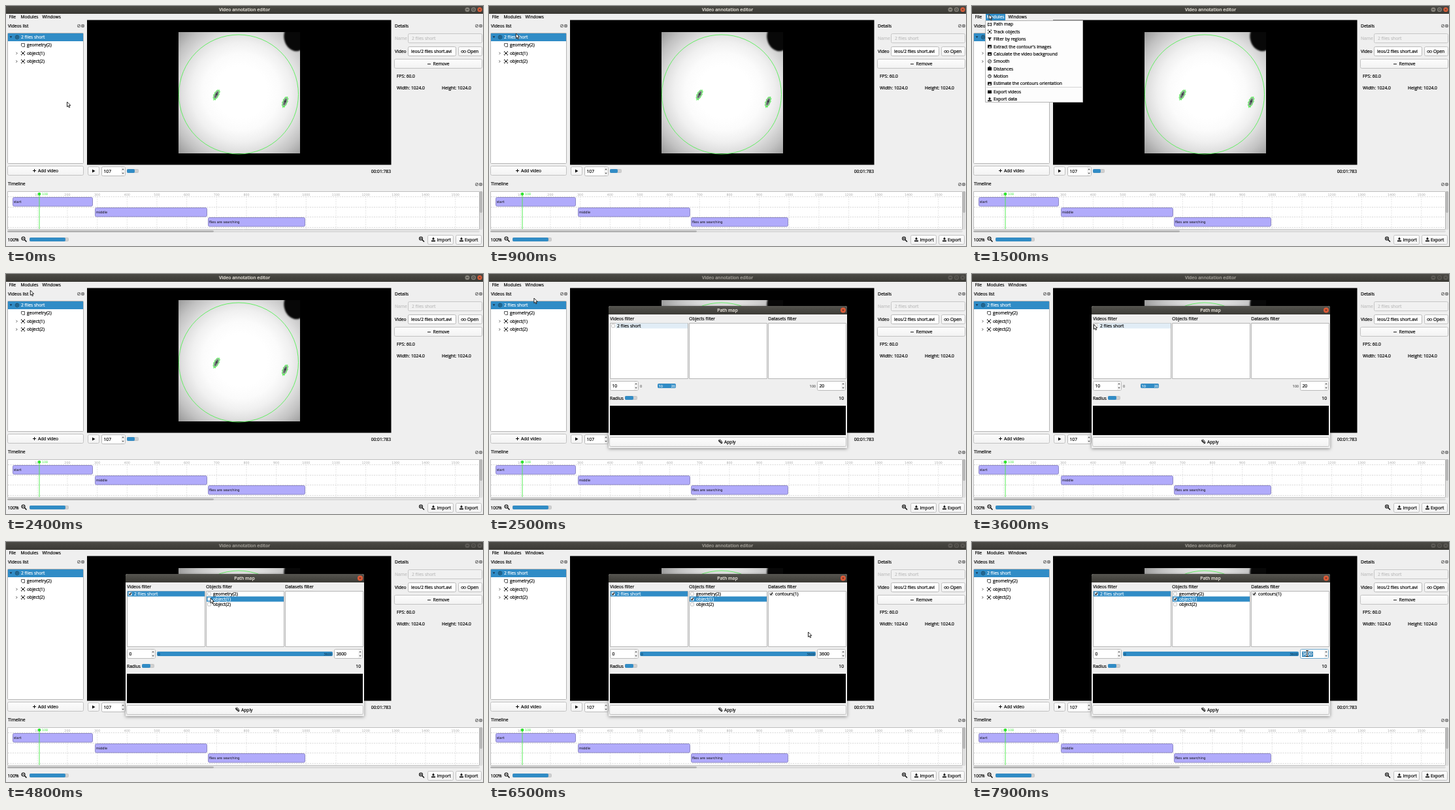
These frames come from a looping animation (730 by 368 pixels, 8 s). An HTML page with a canvas:

```html
<!DOCTYPE html>
<html lang="en">
<head>
<meta charset="utf-8">
<title>Video annotation editor</title>
<style>
html, body { margin: 0; width: 100%; height: 100%; overflow: hidden; background: #efefef; }
canvas { display: block; width: 730px; height: 368px; }
</style>
</head>
<body>
<canvas id="stage" width="730" height="368"></canvas>
<script>
const ctx = document.getElementById('stage').getContext('2d');
const LOOP = 8000, STEP = 100;
const BLUE = '#308cc6', GREEN = '#55f055', INK = '#0a0a0a';
const UI = '"Open Sans", "Noto Sans", sans-serif';
const SMALL = '"DejaVu Sans", sans-serif';

// Times of the user's actions, in ms.
const AT = { menuOpen: 1400, hoverItem: 1700, menuClose: 2000, dialog: 2500, pickVideo: 4000,
  pickObject: 4800, showData: 5000, pickData: 5600, focus: 6800, select: 7500, caretOff: 7900 };

// [time, x, y] of the pointer tip.
const POINTER = [[0, 93.5, 147], [300, 85, 125], [1200, 26, 13], [1500, 26, 13], [1800, 37.3, 25],
  [2400, 37.3, 25], [2600, 100.5, 49], [3100, 172, 74], [3800, 190, 78], [4000, 190, 78],
  [4500, 313, 86], [5100, 313, 86], [5400, 432, 78], [6000, 432, 78], [6500, 488.5, 138],
  [6800, 507, 172], [7100, 507, 172], [7300, 513, 171], [8000, 513, 171]];

function pointerAt(t) {
  const i = POINTER.findIndex((p, k) => k > 0 && t <= p[0]);
  const [t0, x0, y0] = POINTER[i - 1], [t1, x1, y1] = POINTER[i];
  const u = (t - t0) / (t1 - t0), e = u * u * (3 - 2 * u);
  return [x0 + (x1 - x0) * e, y0 + (y1 - y0) * e];
}

function fill(x, y, w, h, color) {
  ctx.fillStyle = color;
  ctx.fillRect(x, y, w, h);
}

function box(x, y, w, h, color, border, r = 0) {
  ctx.beginPath();
  ctx.roundRect(x + .5, y + .5, w - 1, h - 1, r);
  ctx.fillStyle = color;
  ctx.fill();
  ctx.lineWidth = 1;
  ctx.strokeStyle = border;
  ctx.stroke();
}

// A hairline stroke gives UI text the weight of hinted desktop type.
function text(s, x, y, { color = INK, size = 6.7, align = 'left', weight = 400, family = UI } = {}) {
  ctx.font = `${weight} ${size}px ${family}`;
  ctx.textAlign = align;
  ctx.textBaseline = 'alphabetic';
  ctx.fillStyle = ctx.strokeStyle = color;
  ctx.lineWidth = .22;
  const base = y + size * .36;
  ctx.fillText(s, x, base);
  if (family === UI) ctx.strokeText(s, x, base);
}

function line(points, color = INK, width = 1, close = false) {
  ctx.beginPath();
  points.forEach(([x, y]) => ctx.lineTo(x, y));
  if (close) ctx.closePath();
  ctx.strokeStyle = color;
  ctx.lineWidth = width;
  ctx.stroke();
}

function shape(points, color) {
  ctx.beginPath();
  points.forEach(([x, y]) => ctx.lineTo(x, y));
  ctx.fillStyle = color;
  ctx.fill();
}

function disc(x, y, r, color) {
  ctx.beginPath();
  ctx.arc(x, y, r, 0, 7);
  ctx.fillStyle = color;
  ctx.fill();
}

function ring(x, y, r, color, width = 1) {
  ctx.beginPath();
  ctx.arc(x, y, r, 0, 2 * Math.PI);
  ctx.strokeStyle = color;
  ctx.lineWidth = width;
  ctx.stroke();
}

function vertical(y0, y1, top, bottom) {
  const g = ctx.createLinearGradient(0, y0, 0, y1);
  g.addColorStop(0, top);
  g.addColorStop(1, bottom);
  return g;
}

function button(x, y, w, h) {
  box(x, y, w, h, vertical(y, y + h, '#fdfdfd', '#f2f2f2'), '#c2c2c2', 2);
}

function spin(x, y, w, value, focused, selected) {
  box(x, y, w, 15, '#fff', focused ? '#6fa8cc' : '#b9b9b9', 2);
  fill(x + w - 7, y + 1, 6, 13, '#f4f4f4');
  const ax = x + w - 4;
  shape([[ax - 1.7, y + 5.2], [ax, y + 3.2], [ax + 1.7, y + 5.2]], '#555');
  shape([[ax - 1.7, y + 9.8], [ax, y + 11.8], [ax + 1.7, y + 9.8]], '#555');
  if (selected) fill(x + 3, y + 4, 17, 8, '#2d80b5');
  text(value, x + 3.5, y + 8, { color: selected ? '#fff' : INK });
}

function slider(x, y, w, filled) {
  box(x, y, w, 6, '#d0d0d0', '#c6c6c6', 1);
  box(x, y, filled, 6, BLUE, '#3a8dc2', 1);
}

function dockIcons(x, y) {
  for (const dx of [0, 6]) box(x + dx - 2, y - 2, 5, 5, '#ddd', '#777', 1);
  line([[x - 1, y + 2], [x + 2, y - 1]], '#555', .8);
  line([[x + 5, y - 1], [x + 8, y + 2]], '#444', .8);
  line([[x + 8, y - 1], [x + 5, y + 2]], '#444', .8);
}

function arrowIcon(x, y, dir) {
  const tip = y + (dir < 0 ? -3 : 1.2);
  shape([[x - 2.3, tip - 2.6 * dir], [x + 2.3, tip - 2.6 * dir], [x, tip]], INK);
  fill(x - .8, y - 2.8, 1.6, 3.4, INK);
  fill(x - 3, y + 1.4, 6, 1.8, INK);
}

function zoomIcon(x, y, plus) {
  ring(x - 1, y - 1, 2.5, INK, 1.1);
  line([[x + 1, y + 1], [x + 4, y + 4]], INK, 1.5);
  line([[x - 2.3, y - 1], [x + .3, y - 1]], INK, .8);
  if (plus) line([[x - 1, y - 2.3], [x - 1, y + .3]], INK, .8);
}

function targetIcon(x, y) {
  for (const [sx, sy] of [[-1, -1], [1, -1], [-1, 1], [1, 1]])
    line([[x + sx * 2.6, y + sy * 1.3], [x + sx * 2.6, y + sy * 2.6], [x + sx * 1.3, y + sy * 2.6]], INK, .9);
  disc(x, y, 1.4, INK);
}

function cross(x, y, color) {
  line([[x - 1.3, y - 1.3], [x + 1.3, y + 1.3]], color, .9);
  line([[x + 1.3, y - 1.3], [x - 1.3, y + 1.3]], color, .9);
}

function titleBar(active) {
  fill(0, 0, 730, 12, vertical(0, 12, '#4b4a45', '#3a3934'));
  text('Video annotation editor', 365, 5.5,
    { align: 'center', size: 6.8, weight: 600, color: active ? '#dfdbd2' : '#a09d96' });
  [706, 715.5, 725].forEach((x, i) => {
    const close = i === 2, mark = '#35342f';
    disc(x, 5.5, 3.5, active ? (close ? '#e2603a' : '#85827a') : '#5c5a55');
    if (i === 0) line([[x - 1.6, 5.5], [x + 1.6, 5.5]], mark, .9);
    if (i === 1) line([[x - 1.4, 4.1], [x + 1.4, 4.1], [x + 1.4, 6.9], [x - 1.4, 6.9]], mark, .8, true);
    if (close) cross(x, 5.5, mark);
  });
}

function videosPanel() {
  text('Videos list', 3, 30.5);
  dockIcons(111, 30);
  box(2, 41, 117, 201, '#fff', '#b5b5b5', 1);
  fill(3, 42, 115, 12, BLUE);
  shape([[5.7, 46.5], [9.3, 46.5], [7.5, 48.7]], '#123');
  ring(17, 47.8, 2.7, '#12384f', .9);
  shape([[16.2, 46.3], [18.5, 47.8], [16.2, 49.3]], '#12384f');
  text('2 flies short', 23, 47.7, { color: '#f4fafd' });
  line([[23.5, 57.5], [28.5, 57.5], [28.5, 62.5], [25, 62.5], [23.5, 61]], '#444', .9, true);
  text('geometry(2)', 32, 60);
  [72.5, 85].forEach((y, i) => {
    line([[15.5, y - 1.7], [17.2, y], [15.5, y + 1.7]], '#444', .9);
    targetIcon(26, y);
    text(`object(${i + 1})`, 32, y);
  });
  button(2, 245, 117, 15);
  line([[41, 252.5], [46, 252.5]], INK, 1);
  line([[43.5, 250], [43.5, 255]], INK, 1);
  text('Add video', 49, 252.5);
}

function fly(x, y, angle, length) {
  ctx.save();
  ctx.translate(x, y);
  ctx.rotate(angle);
  ctx.beginPath();
  for (let i = 0; i < 24; i++) {
    const a = i * Math.PI / 12, k = 1 + .16 * Math.sin(i * 2.7);
    ctx.lineTo(Math.cos(a) * length * k, Math.sin(a) * 3.4 * k);
  }
  ctx.closePath();
  ctx.fillStyle = '#a9bdab';
  ctx.fill();
  ctx.strokeStyle = GREEN;
  ctx.lineWidth = .9;
  ctx.stroke();
  ctx.beginPath();
  ctx.ellipse(0, 0, length * .7, 1.9, 0, 0, 7);
  ctx.fillStyle = '#626c6c';
  ctx.fill();
  disc(length * .1, 0, 1.5, '#3a4044');
  ctx.restore();
}

function videoPanel() {
  fill(124, 21.5, 465.5, 222, '#000');
  ctx.save();
  ctx.beginPath();
  ctx.rect(264, 40, 186, 186);
  ctx.clip();
  const light = ctx.createRadialGradient(360, 132, 40, 360, 132, 136);
  [[0, '#fff'], [.2, '#fbfbfb'], [.38, '#f0f0f0'], [.54, '#dfdfdf'], [.75, '#c2c2c2'], [1, '#949494']]
    .forEach(([p, c]) => light.addColorStop(p, c));
  fill(264, 40, 186, 186, light);
  ctx.filter = 'blur(1px)';
  ctx.beginPath();
  ctx.ellipse(443, 48, 17.5, 21.5, -.2, 0, 7);
  ctx.fillStyle = '#080808';
  ctx.fill();
  ctx.filter = 'none';
  ctx.restore();
  ring(356, 135.5, 91.5, GREEN, .9);
  fly(322, 136, -1.1, 8);
  fly(427, 147, -1.2, 8);

  button(125, 246, 18, 14);
  shape([[132, 250.5], [136.5, 253], [132, 255.5]], INK);
  spin(146, 246, 37, '107');
  slider(185, 250, 18, 12);
  text('00:01:783', 589, 253.5, { align: 'right' });
}

function detailsPanel() {
  text('Details', 595, 30.5);
  dockIcons(720, 30);
  text('Name', 595, 50, { color: '#c4c4c4' });
  box(615, 42, 114, 15, '#f1f1f1', '#c6c6c6', 2);
  text('2 flies short', 621, 50, { color: '#c0c0c0' });
  text('Video', 595, 70);
  box(615, 62, 74, 15, '#fff', '#b9b9b9', 2);
  text('leos/2 flies short.avi', 620, 70);
  button(692, 62, 37, 15);
  for (const x of [698.5, 702]) {
    ctx.beginPath();
    ctx.roundRect(x - 1.8, 68.4, 3.6, 3, 1.5);
    ctx.lineWidth = .8;
    ctx.strokeStyle = INK;
    ctx.stroke();
  }
  text('Open', 706, 70);
  button(594, 81, 135, 15);
  line([[645, 89], [650, 89]], INK, 1);
  text('Remove', 653.5, 89);
  text('FPS: 60.0', 598, 107.3);
  text('Width: 1024.0', 598, 126);
  text('Height: 1024.0', 667, 126);
}

const frameX = n => 2.6 + n * .4567;

function timeline() {
  text('Timeline', 3, 273);
  dockIcons(720, 273);
  box(2, 284, 723, 59, '#fff', '#bdbdbd');
  ctx.save();
  ctx.setLineDash([2, 1.5]);
  for (const y of [292.5, 308.5, 323.5, 339.5]) line([[3, y], [724, y]], '#cfcfcf', .8);
  for (let n = 100; n <= 1500; n += 100) line([[frameX(n), 292], [frameX(n), 342]], '#dedede', .8);
  ctx.restore();
  for (let n = 100; n <= 1500; n += 100)
    text(n, frameX(n), 289.5, { align: 'center', size: 4.8, family: SMALL, color: '#a8a8a8' });
  [['start', 10, 133, 293], ['middle', 136, 308, 309], ['flies are searching', 309, 458, 324]].forEach(([s, x0, x1, y]) => {
    box(x0, y, x1 - x0, 14.5, '#b1abfb', '#8f8ac6', 2);
    text(s, x0 + 1.7, y + 7.3, { size: 5.1, family: SMALL });
  });
  line([[51, 288], [51, 342]], 'rgba(70,235,70,.65)', 1.4);
  disc(51, 288.2, 2.3, '#2be52b');
  text('108', 55, 288.3, { size: 4.8, family: SMALL, color: '#45e845' });

  box(725, 284, 4, 59, '#e2e2e2', '#d6d6d6', 1);
  box(725, 284, 4, 33, '#bcbcbc', '#b0b0b0', 1);
  box(2, 344, 723, 3, '#e2e2e2', '#d8d8d8', 1);
  box(2, 344, 316, 3, '#b6b6b6', '#b2b2b2', 1);

  text('100%', 2.5, 358.3);
  zoomIcon(27.5, 357.5, false);
  slider(36, 355, 60, 55);
  zoomIcon(636, 357.5, true);
  button(645, 351, 40, 15);
  arrowIcon(654, 358, -1);
  text('Import', 659.5, 358.3);
  button(688, 351, 40, 15);
  arrowIcon(697, 358, -1);
  text('Export', 702, 358.3);
}

function menuBar(open) {
  if (open) fill(21, 12, 30, 10, BLUE);
  text('File', 4.5, 17);
  text('Modules', 22.5, 17, { color: open ? '#fff' : INK });
  text('Windows', 55.5, 17);
}

const MENU = ['Path map', 'Track objects', 'Filter by regions', "Extract the contour's images",
  'Calculate the video background', 'Smooth', 'Distances', 'Motion',
  'Estimate the contours orientation', 'Export videos', 'Export data'];

function menuIcon(i, y) {
  const x = 27;
  if (i === 0) {
    line([[x - 2.5, y - 2], [x - 2.5, y + 2.5], [x, y + 1.5], [x + 2.5, y + 2.5], [x + 2.5, y - 2], [x, y - 1]], INK, .9, true);
  } else if (i === 1) targetIcon(x, y);
  else if (i === 2) shape([[x - 3, y - 2.5], [x + 3, y - 2.5], [x + .8, y + .3], [x + .8, y + 3], [x - .8, y + 2], [x - .8, y + .3]], INK);
  else if (i === 5) {
    ring(x, y, 2.5, INK, .8);
    line([[x - 1.5, y + 1], [x + 1.5, y - 1]], INK, .8);
  } else if (i === 7) {
    ring(x, y, 2.4, INK, .9);
    line([[x, y - 1.5], [x, y], [x + 1.3, y]], INK, .7);
  } else if (i === 10) arrowIcon(x, y, 1);
  else {
    fill(x - 3, y - 2.5, 6, 5, INK);
    if (i === 6) line([[x - 1, y - 2.5], [x - 1, y - 3.4], [x + 1, y - 3.4], [x + 1, y - 2.5]], INK, .8);
    if (i === 9) for (let k = -2; k <= 2; k += 2) fill(x + k - .4, y - 2.2, .8, .9, '#fff');
    if (i < 5 || i === 8) shape([[x - 2, y + 1.6], [x - .7, y - .2], [x, y + .6], [x + .9, y - .8], [x + 2, y + 1.6]], '#fff');
  }
}

function menu(hover) {
  box(20, 22, 150, 126, '#fdfdfd', '#b2b2b2');
  MENU.forEach((s, i) => {
    const y = 28 + i * 11.38 + (i > 8 ? 1.2 : 0);
    const lit = hover && i === 0;
    if (lit) fill(21, 23, 148, 10.5, BLUE);
    menuIcon(i, y);
    text(s, 33, y, { color: lit ? '#fff' : INK });
  });
  line([[22, 124.5], [168, 124.5]], '#d4d4d4', 1);
}

function checkRow(x, row, label, { checked, selected, hover } = {}) {
  const y = 79.5 + row * 8;
  if (selected) fill(x + 1, y - 4, 118, 8, BLUE);
  else if (hover) fill(x + 9, y - 4, 110, 8, '#e1edf6');
  box(x + 2, y - 3, 6, 6, '#fff', selected ? '#9cc4de' : '#c4c4c4', 1);
  if (checked) line([[x + 3.4, y - .1], [x + 4.7, y + 1.5], [x + 6.8, y - 1.9]], INK, 1.2);
  text(label, x + 11, y, { color: selected ? '#e8f4fb' : INK });
}

function dialog(t) {
  const video = t >= AT.pickVideo, object = t >= AT.pickObject;
  ctx.save();
  ctx.shadowColor = 'rgba(0,0,0,.45)';
  ctx.shadowBlur = 5;
  ctx.shadowOffsetY = 1;
  ctx.beginPath();
  ctx.roundRect(183, 49, 365, 218, [3, 3, 0, 0]);
  ctx.fillStyle = '#efefef';
  ctx.fill();
  ctx.restore();
  ctx.beginPath();
  ctx.roundRect(183, 49, 365, 13, [3, 3, 0, 0]);
  ctx.fillStyle = vertical(49, 62, '#565550', '#3b3a35');
  ctx.fill();
  text('Path map', 365, 55.5, { align: 'center', size: 6.8, weight: 600, color: '#dfdbd2' });
  disc(542, 55.5, 4, '#df5b37');
  cross(542, 55.5, '#47231a');

  [['Videos', 185], ['Objects', 306], ['Datasets', 427]].forEach(([s, x]) => {
    text(`${s} filter`, x + .3, 69);
    box(x, 75, 120, 86, '#fff', '#b5b5b5');
  });
  checkRow(185, 0, '2 flies short', { checked: video, selected: video, hover: true });
  if (video) {
    checkRow(306, 0, 'geometry(2)');
    checkRow(306, 1, 'object(1)', { checked: t >= AT.showData, selected: object });
    checkRow(306, 2, 'object(2)');
  }
  if (t >= AT.showData) checkRow(427, 0, 'contours(1)', { checked: t >= AT.pickData });

  const small = { size: 5.5, color: '#666' };
  spin(185, 164, 44, video ? '0' : '10');
  spin(502, 164, 44, video ? '3600' : '20', t >= AT.focus, t >= AT.select);
  if (t >= AT.select && t < AT.caretOff) fill(521, 168, 1, 8, INK);
  if (video) {
    box(231, 168, 269, 7, BLUE, '#3a8dc2', 1);
    text('0', 232.5, 171.7, { ...small, color: '#174d70' });
    text('3600', 499, 171.7, { ...small, align: 'right', color: '#174d70' });
  } else {
    text('0', 231, 171.7, small);
    text('100', 500, 171.7, { ...small, align: 'right' });
    box(258, 168, 28, 7, BLUE, '#3a8dc2', 1);
    text('10', 259.5, 171.7, { ...small, color: '#e4f1f8' });
    text('20', 285, 171.7, { ...small, align: 'right', color: '#e4f1f8' });
  }
  text('Radius', 185, 190.5);
  slider(208, 187, 19, 13);
  text('10', 543, 190.5, { align: 'right' });
  fill(185, 202, 361, 45, '#000');
  button(184, 250, 363, 15);
  ring(353.5, 256, 1.7, INK, .9);
  line([[351.5, 254.5], [354.5, 258.5], [357, 259.5]], INK, 1.2);
  line([[355.5, 256], [357, 258], [355, 260.5]], INK, .9);
  text('Apply', 360, 258);
}

function pointer(t) {
  const [x, y] = pointerAt(t);
  if (t >= AT.focus) {
    for (const [color, w] of [['#fff', 2], ['#111', 1]]) {
      line([[x, y - 4], [x, y + 4]], color, w);
      line([[x - 2, y - 4.5], [x + 2, y - 4.5]], color, w);
      line([[x - 2, y + 4.5], [x + 2, y + 4.5]], color, w);
    }
    return;
  }
  const outline = [[0, 0], [0, 7.6], [1.7, 6.1], [2.9, 8.8], [4.2, 8.2], [3, 5.6], [5.3, 5.4]]
    .map(([dx, dy]) => [x + dx, y + dy]);
  shape(outline, '#fff');
  line(outline, '#111', .9, true);
}

function draw(now) {
  const t = Math.floor(now % LOOP / STEP) * STEP;
  const menuOpen = t >= AT.menuOpen && t < AT.menuClose;
  const dialogOpen = t >= AT.dialog;
  fill(0, 0, 730, 368, '#efefef');
  titleBar(!dialogOpen);
  menuBar(menuOpen);
  videosPanel();
  videoPanel();
  detailsPanel();
  timeline();
  if (menuOpen) menu(t >= AT.hoverItem);
  if (dialogOpen) dialog(t);
  pointer(t);
}

const start = performance.now();
function tick() {
  draw(performance.now() - start);
  requestAnimationFrame(tick);
}
tick();
</script>
</body>
</html>
```
